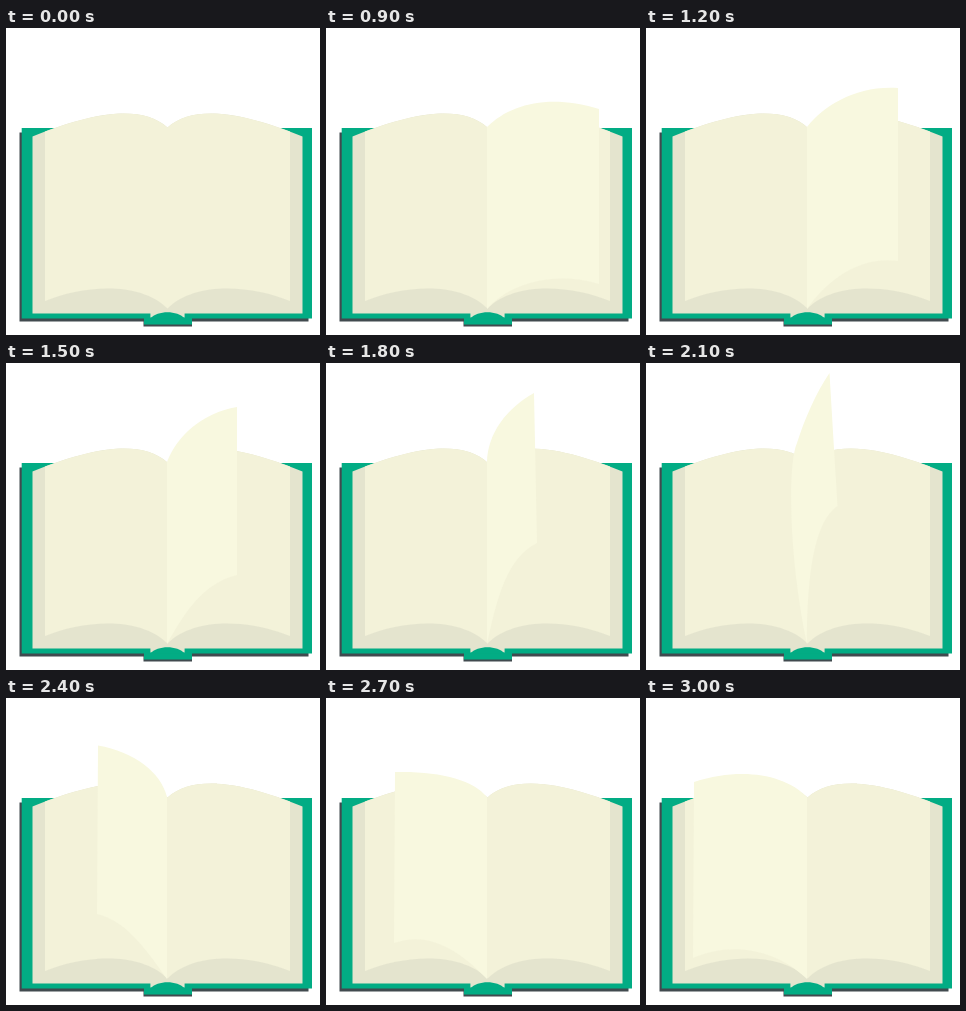
Write an HTML page that moves like this. It is 314 by 307 pixels and loops after 3.3 s.

```html
<!DOCTYPE html>
<html lang="en">
<head>
<meta charset="utf-8">
<title>Turning page</title>
<style>
  html, body { margin: 0; width: 100%; height: 100%; overflow: hidden; background: #fff; }
  svg { display: block; width: 100%; height: 100%; }
</style>
</head>
<body>
<svg viewBox="0 0 314 307">
  <defs>
    <clipPath id="inner"><path d="M39 0H284V307H39Z"/></clipPath>
  </defs>
  <path fill="#414a4f" d="M13.5 104.5H302.5V293.5H186V298.5H137.5V293.5H13.5Z"/>
  <path fill="#02ac84" d="M15.7 100H306V290.4H186V296.4H138V290.4H15.7Z"/>
  <path fill="#e4e4ce"
    d="M26.5 108.5C75 88.5 133 73 161.5 99.5C190 73 248 88.5 296.5 108.5V285.5H26.5Z"/>
  <path fill="#f3f2d9" clip-path="url(#inner)"
    d="M26.5 108.5C75 88.5 133 73 161.5 99.5C190 73 248 88.5 296.5 108.5V273H284C248 258 190 252 161.5 280.5C133 252 75 258 39 273H26.5Z"/>
  <path id="leaf" fill="#f8f8df"/>
  <path fill="#e4e4ce" d="M144.4 285H178.6V289.6H144.4Z"/>
  <path fill="#02ac84" d="M144 290.5C152 282 171 282 179 290.5Z"/>
</svg>
<script>
  const LOOP = 3300, REST = 900, STEP = 300;
  const leaf = document.getElementById('leaf');

  // A leaf hinged on the spine: top curve, free edge, bottom curve.
  const hinged = (top, bottom) => `M161 99C${top}L${bottom}161 281Z`;

  const poses = [
    hinged('185 75 225 66 273 81', '273 256C230 243 185 254 '),
    hinged('178 77 212 57 252 60', '252 233C215 228 183 250 '),
    hinged('171 73 196 50 231 44', '231 212C198 220 180 247 '),
    hinged('162 70 180 46 208 30', '211 180C182 195 172 230 '),
    'M161 281C142 190 142 100 151 80C159 55 170 30 183.5 10Q187 70 191.5 143C174 155 161 190 161 281Z',
    hinged('155 74 128 54 92 47.5', '91 216C120 222 142 254 '),
    hinged('147 82 115 73 69 74', '68 245C104 232 135 254 '),
    hinged('138 76 95 69 48 84', '47 260C85 243 130 251 ')
  ];

  function draw(ms) {
    const t = ms % LOOP;
    leaf.setAttribute('d', t < REST ? '' : poses[Math.floor((t - REST) / STEP)]);
  }

  const start = performance.now();
  function tick() {
    draw(performance.now() - start);
    requestAnimationFrame(tick);
  }
  tick();
</script>
</body>
</html>
```
